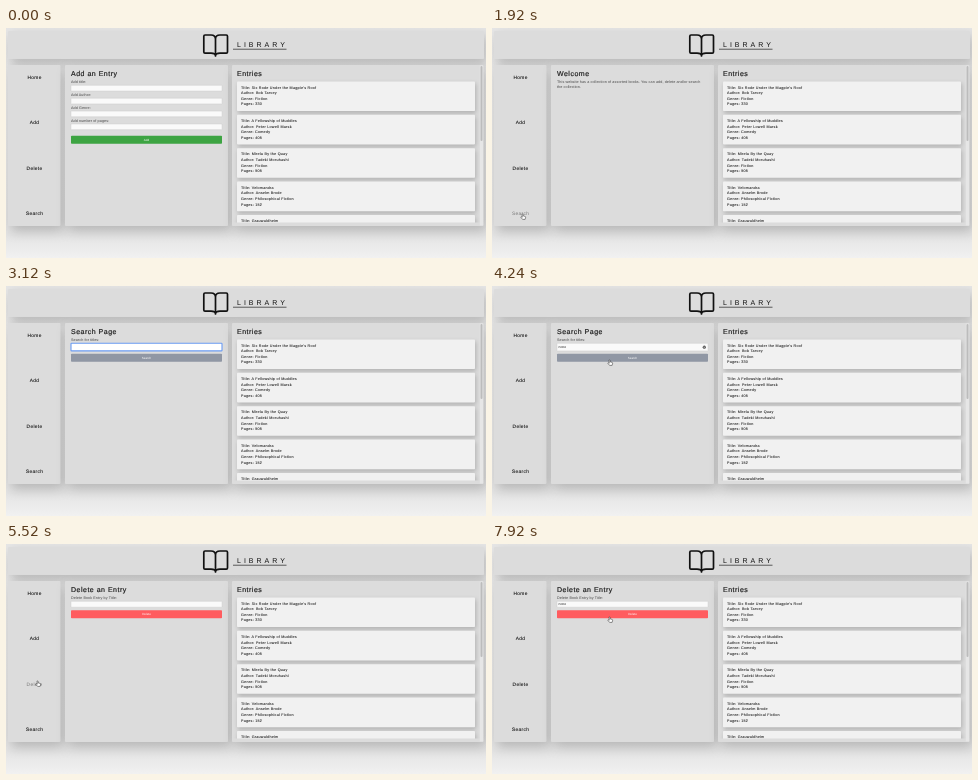
Animation, 480 px wide and 230 px high, one loop 8 s. Source, as an HTML page:

```html
<!DOCTYPE html>
<html lang="en">
<head>
<meta charset="utf-8">
<title>Library</title>
<style>
  html, body { margin: 0; width: 100%; height: 100%; overflow: hidden; background: #eee; }
  svg { display: block; width: 100vw; height: 100vh; }
  text { font-family: "Liberation Sans", Arial, sans-serif; text-rendering: geometricPrecision; white-space: pre; }
  .panel { fill: #dcdcdc; filter: drop-shadow(3px 5px 6px rgba(0, 0, 0, .2)); }
  .card { fill: #f1f1f1; filter: drop-shadow(1.5px 2px 2px rgba(0, 0, 0, .2)); }
  .brand { font-size: 7px; letter-spacing: 3px; fill: #111; }
  .heading { font-size: 7px; letter-spacing: .5px; fill: #1c1c1c; stroke: #1c1c1c; stroke-width: .18px; }
  .nav { font-size: 4.8px; letter-spacing: .35px; fill: #111; stroke: #111; stroke-width: .08px; text-anchor: middle; }
  .nav.hover { fill: #777; stroke: none; }
  .label { font-size: 3.7px; letter-spacing: .1px; fill: #444; }
  .entry { font-size: 3.7px; letter-spacing: .25px; fill: #1a1a1a; stroke: #1a1a1a; stroke-width: .06px; }
  .button { font-size: 3px; fill: #fff; text-anchor: middle; }
  .typed { font-size: 3.4px; fill: #222; }
  .field { fill: #fafafa; stroke: #c6c6c6; stroke-width: .4px; }
  .field.focus { fill: #fff; stroke: #6b9cf2; stroke-width: 1.1px; }
</style>
</head>
<body>
<svg id="stage" viewBox="0 0 480 230" preserveAspectRatio="none"></svg>
<script>
const LOOP = 8000, TICK = 80, WORD = "none";
const stage = document.getElementById("stage");

function add(parent, tag, attrs = {}, content = "") {
  const node = document.createElementNS("http://www.w3.org/2000/svg", tag);
  for (const key in attrs) node.setAttribute(key, attrs[key]);
  node.textContent = content;
  parent.append(node);
  return node;
}
const rect = (parent, x, y, width, height, attrs) =>
  add(parent, "rect", { x, y, width, height, ...attrs });
const label = (parent, cls, x, y, content) =>
  add(parent, "text", { class: cls, x, y }, content);

// Backdrop, with the soft shade under the panels
const defs = add(stage, "defs");
const shade = add(defs, "linearGradient", { id: "shade", x2: 0, y2: 1 });
[[0, "#e6e6e6"], [.82, "#e2e2e2"], [.9, "#e4e4e4"], [1, "#f1f1f1"]].forEach(([offset, color]) =>
  add(shade, "stop", { offset, "stop-color": color }));
rect(stage, 0, 0, 480, 230, { fill: "url(#shade)" });

const panel = (x, y, w, h) => rect(stage, x, y, w, h, { class: "panel", rx: 1 });
panel(2, 3, 476, 28);
panel(2, 37, 52.5, 161);
panel(59, 37, 163, 161);
panel(226, 37, 251.5, 161);

// Header
add(stage, "path", {
  d: "M209.5 11 Q209.5 7 205 7 H199 Q197.8 7 197.8 8.2 V24 Q197.8 25.2 199 25.2 H205 Q209.5 25.2 209.5 28" +
     " Q209.5 25.2 214 25.2 H220.3 Q221.5 25.2 221.5 24 V8.2 Q221.5 7 220.3 7 H214 Q209.5 7 209.5 11 V28",
  fill: "none", stroke: "#111", "stroke-width": 1.7, "stroke-linejoin": "round", "stroke-linecap": "round"
});
label(stage, "brand", 231, 19, "LIBRARY");
rect(stage, 227, 20.8, 53.5, .7, { fill: "#222" });

const nav = {};
["Home", "Add", "Delete", "Search"].forEach((name, i) => {
  nav[name] = label(stage, "nav", 28.6, 50.8 + i * 45.4, name);
});

// Entries
label(stage, "heading", 231, 47.6, "Entries");
const clip = add(defs, "clipPath", { id: "list" });
rect(clip, 226, 37, 248, 157.5);
const list = add(stage, "g", { "clip-path": "url(#list)" });
[
  ["Six Rode Under the Magpie's Roof", "Bob Tarvey", "Fiction", 330],
  ["A Fellowship of Muddles", "Peter Lowell Marsk", "Comedy", 405],
  ["Mirela By the Quay", "Tadeki Moruhashi", "Fiction", 505],
  ["Velomandra", "Anselm Brode", "Philosophical Fiction", 152],
  ["Grauwaldheim", "Ida Fenmoor", "Horror", 280]
].forEach((book, i) => {
  const top = 53.4 + i * 33.4;
  rect(list, 231, top, 238, 29.6, { class: "card", rx: .8 });
  ["Title", "Author", "Genre", "Pages"].forEach((key, row) =>
    label(list, "entry", 235, top + 7.2 + row * 5.6, `${key}: ${book[row]}`));
});
rect(stage, 473.8, 37.5, 3.4, 160, { fill: "#e6e6e6" });
rect(stage, 474.5, 38, 2, 75, { fill: "#bcbcbc", rx: 1 });

// Pages of the middle panel
function makePage(title) {
  const group = add(stage, "g");
  label(group, "heading", 65, 47.6, title);
  return group;
}
const makeField = (group, y, h) => rect(group, 65, y, 151, h, { class: "field", rx: .5 });
function makeButton(group, y, fill, caption) {
  rect(group, 65, y, 151, 8, { fill, rx: .8 });
  label(group, "button", 140.5, y + 5.1, caption);
}

const addPage = makePage("Add an Entry");
["title", "Author", "Genre", "number of pages"].forEach((name, i) => {
  label(addPage, "label", 65, 55.3 + i * 12.8, `Add ${name}:`);
  makeField(addPage, 57.3 + i * 12.9, 5.7);
});
makeButton(addPage, 107.8, "#3da442", "Add");

const welcomePage = makePage("Welcome");
label(welcomePage, "label", 65, 55.2, "This website has a collection of assorted books. You can add, delete and/or search");
label(welcomePage, "label", 65, 59.9, "the collection.");

function makeForm(title, prompt, fieldHeight, buttonY, color, caption) {
  const group = makePage(title);
  label(group, "label", 65, 55.3, prompt);
  const field = makeField(group, 57.3, fieldHeight);
  const typed = label(group, "typed", 66.6, 58.4 + fieldHeight / 2, "");
  makeButton(group, buttonY, color, caption);
  return { group, field, typed };
}
const search = makeForm("Search Page", "Search for titles:", 7.6, 67.7, "#9097a4", "Search");
const remove = makeForm("Delete an Entry", "Delete Book Entry by Title:", 5.9, 66.2, "#ff5c5f", "Delete");

const clear = add(search.group, "g");
add(clear, "circle", { cx: 212.3, cy: 61.2, r: 1.6, fill: "#555" });
add(clear, "path", { d: "M211.7 60.6l1.2 1.2m0 -1.2l-1.2 1.2", stroke: "#fff", "stroke-width": .4 });

const cursor = add(stage, "path", {
  d: "M0 0 Q.7 -.5 1 .3 L1.3 2 L3.1 2.4 Q3.8 2.7 3.6 3.5 L3.1 5.4 H.6 L-1.1 3.3 Q-1.1 2.5 -.2 2.9 L.3 3.2 Z",
  fill: "#fff", stroke: "#222", "stroke-width": .5, "stroke-linejoin": "round"
});

// Timeline
const pages = [
  [0, addPage], [560, welcomePage], [2160, search.group], [4880, remove.group]
];
const trips = [
  [[320, 72, 58], [400, 30, 48], [1280, 30, 48], [1840, 30, 186], [2320, 30, 186], [2800, 118, 60], [3040, 118, 60]],
  [[3840, 118, 62], [4000, 117, 74], [4320, 117, 74], [4640, 31, 137], [5600, 31, 137], [6160, 118, 59], [6400, 118, 59]],
  [[7120, 118, 60], [7440, 117, 73], [8000, 117, 73]]
];
const hovers = [["Home", 400, 1360], ["Search", 1760, 2400], ["Delete", 4640, 5680]];
const forms = [
  { ...search, focus: 2880, typing: 3280, blur: 4080 },
  { ...remove, focus: 6320, typing: 6560, blur: 7520 }
];

function cursorAt(t) {
  const trip = trips.find(p => t >= p[0][0] && t < p[p.length - 1][0]);
  if (!trip) return null;
  const i = trip.findIndex(p => p[0] > t);
  const [t0, x0, y0] = trip[i - 1], [t1, x1, y1] = trip[i];
  const k = (t - t0) / (t1 - t0), ease = k * k * (3 - 2 * k);
  return [x0 + (x1 - x0) * ease, y0 + (y1 - y0) * ease];
}

function draw(now) {
  const t = Math.floor((now % LOOP) / TICK) * TICK;
  const current = pages.filter(p => p[0] <= t).pop()[1];
  for (const [, group] of pages) group.style.display = group === current ? "" : "none";

  for (const [name, from, to] of hovers)
    nav[name].classList.toggle("hover", t >= from && t < to);

  for (const { field, typed, focus, typing, blur } of forms) {
    field.classList.toggle("focus", t >= focus && t < blur);
    const count = t < typing ? 0 : Math.floor((t - typing) / 160) + 1;
    typed.textContent = WORD.slice(0, count);
  }
  clear.style.display = search.typed.textContent ? "" : "none";

  const spot = cursorAt(t);
  cursor.style.display = spot ? "" : "none";
  if (spot) cursor.setAttribute("transform", `translate(${spot})`);
}

const start = performance.now();
function frame() {
  draw(performance.now() - start);
  requestAnimationFrame(frame);
}
frame();
</script>
</body>
</html>
```
